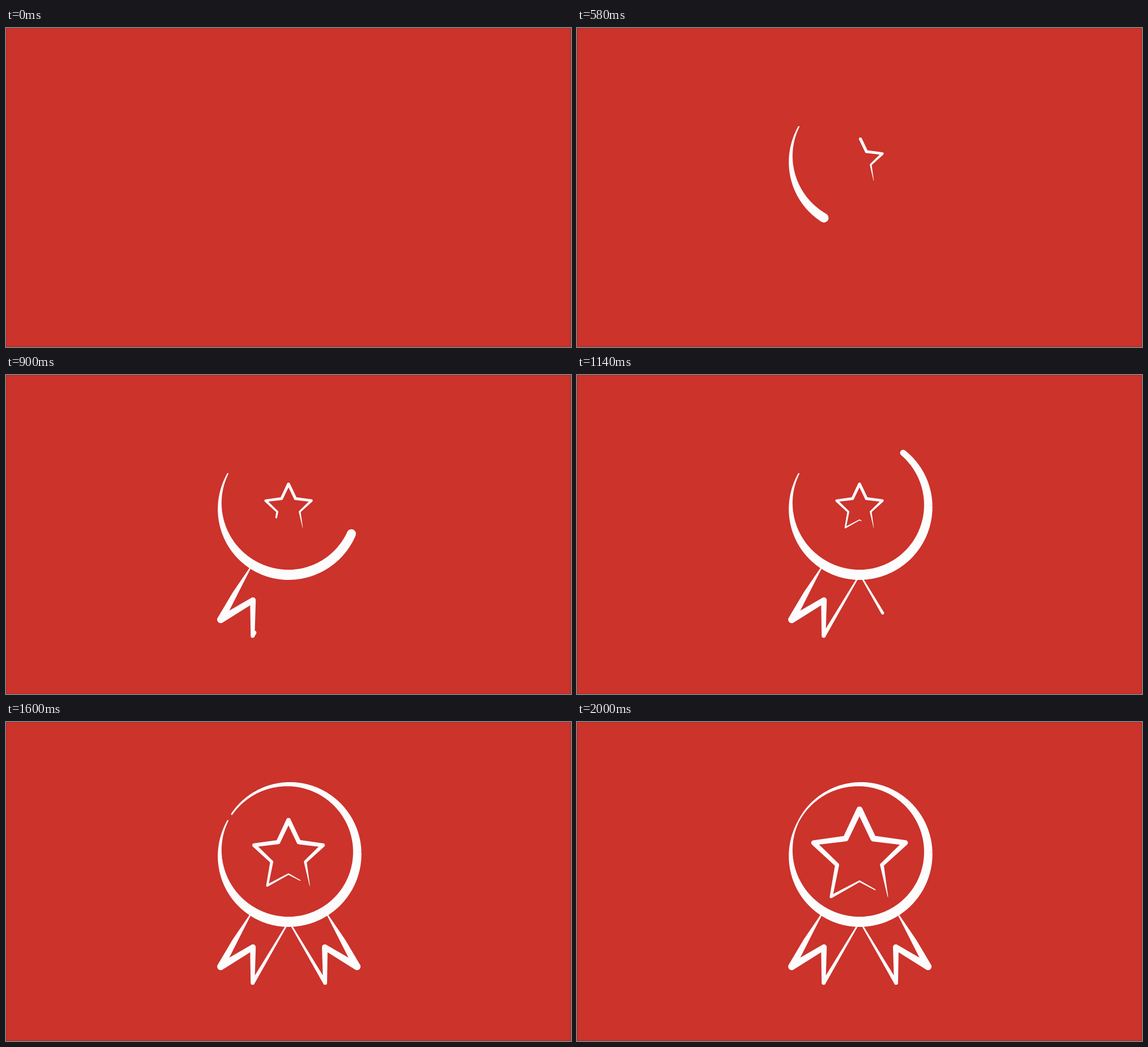
These frames come from a looping animation (996x562 px, 3000 ms). An HTML page with a canvas:

```html
<!DOCTYPE html>
<html lang="en">
<head>
<meta charset="utf-8">
<title>Award ribbon</title>
<style>
  html, body { margin: 0; width: 100%; height: 100%; overflow: hidden; background: #cb332b; }
  canvas { display: block; width: 996px; height: 562px; }
</style>
</head>
<body>
<canvas id="stage" width="996" height="562"></canvas>
<script>
const ctx = document.getElementById('stage').getContext('2d');
const LOOP = 3000, STEP = 20;
const CX = 498, CY = 230;
const RAD = Math.PI / 180;

const clamp = v => Math.min(1, Math.max(0, v));
const ease = (t, from, to) => (1 - Math.cos(Math.PI * clamp((t - from) / (to - from)))) / 2;
const list = (n, make) => Array.from({ length: n }, (_, i) => make(i));

// Brush paths are lists of [x, y, width].
// The ring runs from the upper left, down and round, and is thickest near the bottom.
const RING = { radius: 121.2, start: -27.6, sweep: 363, thickest: 116 };

function ringWidth(deg) {
  const reach = deg < RING.thickest ? RING.thickest : RING.sweep - RING.thickest;
  const offset = clamp(Math.abs(deg - RING.thickest) / reach);
  return 2.4 + 15.5 * Math.cos(offset * 89.9 * RAD) ** 1.3;
}

const ring = list(182, i => {
  const angle = (i * 2 + RING.start) * RAD;
  const r = RING.radius + .8 * Math.sin(angle);
  return [CX - r * Math.cos(angle), CY + r * Math.sin(angle), ringWidth(i * 2)];
});

// Five-pointed star, drawn anticlockwise from its lower right point
const star = list(11, i => {
  const angle = (144 - 36 * i) * RAD;
  const r = i % 2 ? 41.5 : 85;
  const width = 1 + 9.5 * Math.sin(Math.PI * (i / 10) ** .7);
  return [CX + r * Math.sin(angle), 239 - r * Math.cos(angle), width];
});
const STAR_END = .955;

const leftRibbon = [
  [430.5, 340, 2.4], [403.8, 385, 9], [378.5, 431, 12.5],
  [435.3, 396.8, 10], [434.8, 459.5, 7], [493.5, 360, 2.6]
];
const rightRibbon = leftRibbon.map(([x, y, w]) => [997.3 - x, y, w]).reverse();

const pathLength = pts => pts.slice(1).reduce(
  (sum, p, i) => sum + Math.hypot(p[0] - pts[i][0], p[1] - pts[i][1]), 0);

function dot([x, y, w]) {
  ctx.moveTo(x + w / 2, y);
  ctx.arc(x, y, w / 2, 0, 2 * Math.PI, true);
}

// Tapered stroke with round joints, drawn up to the given length
function brush(pts, length) {
  if (length <= 0) return;
  ctx.beginPath();
  dot(pts[0]);
  for (let i = 1; i < pts.length && length > 0; i++) {
    const a = pts[i - 1], dx = pts[i][0] - a[0], dy = pts[i][1] - a[1];
    const d = Math.hypot(dx, dy), u = Math.min(1, length / d);
    const b = a.map((v, k) => v + (pts[i][k] - v) * u);
    const nx = -dy / d / 2, ny = dx / d / 2;
    ctx.moveTo(a[0] + nx * a[2], a[1] + ny * a[2]);
    ctx.lineTo(b[0] + nx * b[2], b[1] + ny * b[2]);
    ctx.lineTo(b[0] - nx * b[2], b[1] - ny * b[2]);
    ctx.lineTo(a[0] - nx * a[2], a[1] - ny * a[2]);
    ctx.closePath();
    dot(b);
    length -= d;
  }
  ctx.fill();
}

const reveal = (pts, progress) => brush(pts, pathLength(pts) * progress);

function drawRing(t) {
  const deg = RING.sweep * ease(t, -20, 1780);
  brush(ring, deg * RAD * RING.radius - ringWidth(deg) / 2);
}

function drawStar(t) {
  const scale = .5 + .5 * ease(t, 1400, 1800);
  ctx.save();
  ctx.translate(CX, CY);
  ctx.scale(scale, scale);
  ctx.translate(-CX, -CY);
  reveal(star, STAR_END * ease(t, 0, 1320));
  ctx.restore();
}

function draw(t) {
  ctx.fillStyle = '#cb332b';
  ctx.fillRect(0, 0, 996, 562);
  ctx.strokeStyle = '#a82c26';
  ctx.strokeRect(.5, .5, 995, 561);
  if (t < 40) return;

  ctx.fillStyle = '#fdfcfd';
  drawRing(t);
  reveal(leftRibbon, ease(t, 595, 1085));
  reveal(rightRibbon, ease(t, 995, 1490));
  drawStar(t);
}

const start = performance.now();
function tick() {
  const t = (performance.now() - start) % LOOP;
  draw(Math.floor(t / STEP) * STEP);
  requestAnimationFrame(tick);
}
tick();
</script>
</body>
</html>
```
